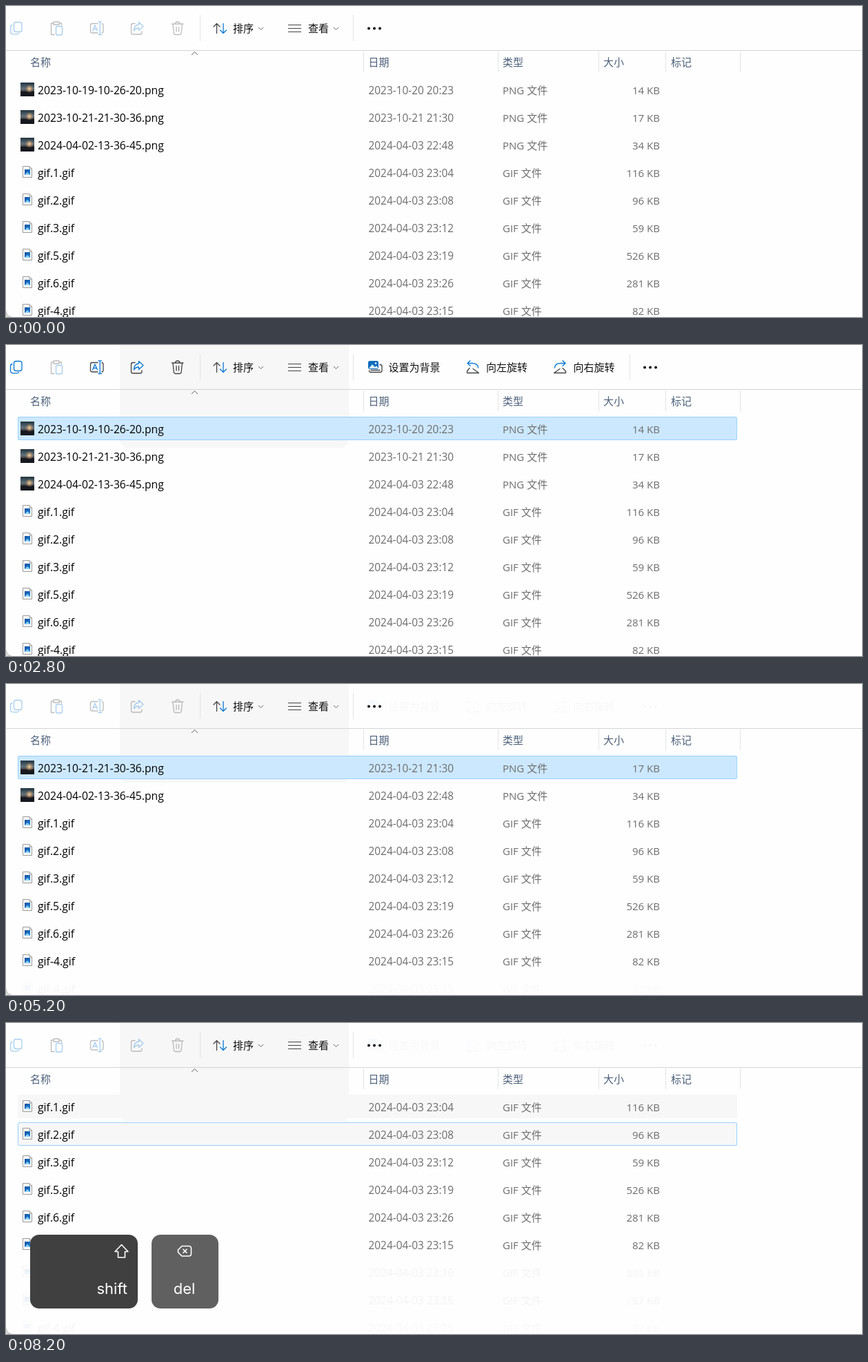
An HTML page that plays this animation: 1241 by 451 pixels, repeating every 8800 ms.

```html
<!DOCTYPE html>
<html lang="zh-CN">
<head>
<meta charset="utf-8">
<title>文件列表</title>
<style>
html, body { margin: 0; width: 100%; height: 100%; overflow: hidden; background: #fefefe; }
svg { display: block; width: 1241px; height: 451px; }
text { font-family: "Open Sans", "Noto Sans CJK SC", "Noto Sans CJK", sans-serif; font-size: 15px; white-space: pre; }
.key { font-family: Inter, sans-serif; font-size: 22px; fill: #fff; }
.line { fill: none; stroke: #444; stroke-width: 1.3; stroke-linecap: round; stroke-linejoin: round; }
.blue { stroke: #0a78d4; }
</style>
</head>
<body>
<svg id="stage" viewBox="0 0 1241 451" xmlns="http://www.w3.org/2000/svg">
  <defs>
    <linearGradient id="sky" x2="0" y2="1">
      <stop offset="0" stop-color="#20333f"/>
      <stop offset=".45" stop-color="#62727a"/>
      <stop offset=".6" stop-color="#4c4a4a"/>
      <stop offset=".68" stop-color="#17191f"/>
      <stop offset="1" stop-color="#15181f"/>
    </linearGradient>
    <radialGradient id="sun">
      <stop offset="0" stop-color="#ffe2b0"/>
      <stop offset=".4" stop-color="#d7a878" stop-opacity=".7"/>
      <stop offset="1" stop-color="#d7a878" stop-opacity="0"/>
    </radialGradient>
    <linearGradient id="picture" x2="1" y2="1">
      <stop offset="0" stop-color="#1b4f9c"/>
      <stop offset="1" stop-color="#1687dc"/>
    </linearGradient>
    <g id="png">
      <rect x="21" y="111" width="20" height="20" fill="url(#sky)"/>
      <circle cx="34" cy="120" r="6" fill="url(#sun)"/>
    </g>
    <g id="gif">
      <path d="M24.5 112.5H34L37.5 116V128.500H24.500Z" fill="#fbfbfb" stroke="#9a9a9a"/>
      <path d="M34 112.500V116H37.500" fill="none" stroke="#9a9a9a"/>
      <rect x="27" y="117" width="8" height="8" fill="url(#picture)"/>
      <path d="M27 125L31 121L35 125Z" fill="#8fd0f5"/>
    </g>
  </defs>
  <g id="scene"></g>
</svg>
<script>
const LOOP = 8800, STEP = 200;
const HOVER = '#e5f3ff', SELECTED = '#cce8ff', EDGE = '#99d1ff', SHADE = '#f7f7f7';
const GREY = '#6d6d6d';

const files = [
  ['2023-10-19-10-26-20.png', '2023-10-20 20:23', 14],
  ['2023-10-21-21-30-36.png', '2023-10-21 21:30', 17],
  ['2024-04-02-13-36-45.png', '2024-04-03 22:48', 34],
  ['gif.1.gif', '2024-04-03 23:04', 116],
  ['gif.2.gif', '2024-04-03 23:08', 96],
  ['gif.3.gif', '2024-04-03 23:12', 59],
  ['gif.5.gif', '2024-04-03 23:19', 526],
  ['gif.6.gif', '2024-04-03 23:26', 281],
  ['gif-4.gif', '2024-04-03 23:15', 82]
];

const within = (t, from, to) => t >= from && t < to;
const text = (x, y, s, fill = '#111', extra = '') => `<text x="${x}" y="${y}" fill="${fill}" ${extra}>${s}</text>`;
const rect = (x, y, w, h, fill, extra = '') => `<rect x="${x}" y="${y}" width="${w}" height="${h}" fill="${fill}" ${extra}/>`;
const line = (d, cls = '') => `<path class="line ${cls}" d="${d}"/>`;
const group = (s, attrs) => `<g ${attrs}>${s}</g>`;
const vline = (x, y, h) => rect(x, y, 1, h, '#e4e4e4');
const dots = x => [x - 8, x, x + 8].map(cx => `<circle cx="${cx}" cy="32.500" r="2" fill="#111"/>`).join('');
const chevron = x => `<path d="M${x} 31l3.500 3.500l3.500 -3.500" fill="none" stroke="#666"/>`;

const copyIcon = '<rect class="line blue" x="11.500" y="23.500" width="11.500" height="14" rx="3"/>' +
  line('M9 27.500Q6.500 28 6.500 31V37Q6.500 40.800 10.500 40.800H15.500Q18 40.800 18.600 39.500', 'blue');
const pasteIcon = line('M69 25H65.500V41.500H70M77 25H80.500V28M69 23H77V27H69Z') +
  '<rect class="line blue" x="72.500" y="29.500" width="9" height="12.500" rx="2"/>';
const renameIcon = line('M133 25.500H125Q122.500 25.500 122.500 28V36.500Q122.500 39 125 39H133M139 25.500Q141 26 141 28V36.500Q141 38.500 139 39') +
  line('M125.500 36L129 28L132.500 36M126.800 33.500H131.200M134 22.800H138.500M136.200 22.800V41.500M134 41.500H138.500', 'blue');
const shareIcon = line('M187 25.500H184Q181.500 25.500 181.500 28V38.500Q181.500 41 184 41H194.500Q197 41 197 38.500V37') +
  line('M192.500 23.500L199 29.500L192.500 35.500V32Q187.500 32 185.500 36Q185.500 27.500 192.500 27Z', 'blue');
const trashIcon = line('M240.500 26H257M245.500 26Q245.500 23 248.800 23Q252 23 252 26M242 26L243.300 39Q243.500 41.500 246 41.500H251.500Q254 41.500 254.200 39L255.500 26M247 30.500V37M250.500 30.500V37');

function toolbar(on) {
  const dim = 'opacity=".35"';
  const state = on ? '' : dim;
  return group(copyIcon, state) + group(pasteIcon, dim) +
    group(renameIcon + shareIcon + trashIcon, state) +
    vline(281, 13, 38) + vline(503, 13, 38) +
    line('M305.500 39.500V25.500M301 30L305.500 25.500L310 30') +
    line('M315 25.500V39.500M310.500 35L315 39.500L319.500 35', 'blue') +
    text(329, 38, '排序') + chevron(366) +
    [27, 32, 37].map(y => rect(409, y, 19, 1, '#444')).join('') +
    text(438, 38, '查看') + chevron(475) +
    (on ? imageTools() : dots(534));
}

function imageTools() {
  return rect(525, 23, 15, 12, '#0f6cbd', 'rx="2.500"') +
    '<path d="M526 34L531 28L535 32L537 30L540 34Z" fill="#d8ecfb"/><circle cx="536" cy="26.500" r="1.300" fill="#fff"/>' +
    line('M542 28.500Q545 28.500 545 31V37Q545 39.500 542.500 39.500H529Q526.500 39.500 526.500 37M529 36.500H542') +
    line('M672 33.500L668.500 38V40.500H685.500L677 34.500') +
    line('M684.500 33Q684 26.500 676 26.500H669M673 22.800L669 26.500L673 30.200', 'blue') +
    line('M807 33.500L811.500 38V40.500H794.500L803 34.500') +
    line('M795.500 33Q796 26.500 804 26.500H811M807 22.800L811 26.500L807 30.200', 'blue') +
    text(554.500, 38, '设置为背景') + text(696, 38, '向左旋转') + text(822.500, 38, '向右旋转') +
    vline(904, 13, 38) + dots(934);
}

function header(hovered) {
  const labels = [[35, '名称'], [525.500, '日期'], [720, '类型'], [866, '大小'], [964, '标记']];
  return (hovered ? rect(0, 65, 518, 31, '#d9ebf9') : '') +
    rect(0, 64, 1241, 1, '#d2d5d5') +
    [518, 713, 859, 956, 1064].map(x => vline(x, 66, 30)).join('') +
    labels.map(([x, s]) => text(x, 87, s, '#4c607a')).join('') +
    '<path d="M269 71l4.500 -4.500l4.500 4.500" fill="none" stroke="#666"/>';
}

function row([name, date, size], i, opacity = 1) {
  const type = name.slice(-3);
  const size154 = 'style="font-size:15.400px"';
  return group(`<use href="#${type}"/>` +
    text(46, 128, name, '#000', 'style="font-size:15.700px"') +
    text(525.500, 128, date, GREY, size154) +
    text(720, 128, type.toUpperCase() + ' 文件', GREY) +
    text(948, 128, size + ' KB', GREY, 'text-anchor="end"'),
    `transform="translate(0 ${i * 40})" opacity="${opacity}"`);
}

const bar = (i, fill, edge = fill) =>
  rect(17.5, 104.5 + 40 * i, 1042, 33, fill, `stroke="${edge}" rx="1.500"`);

function highlights(t) {
  let s = '';
  if (within(t, 400, 600)) s += bar(0, HOVER);
  if (within(t, 600, 3000) || within(t, 5200, 5600)) s += bar(0, SELECTED, EDGE);
  if (within(t, 3000, 5200)) s += bar(0, SHADE, EDGE);
  if (within(t, 3600, 4000) || within(t, 4200, 5200) || within(t, 5400, 5600)) s += bar(1, HOVER);
  if (within(t, 5600, 7400)) s += bar(0, SELECTED) + bar(1, SELECTED, EDGE);
  if (t >= 7400) s += bar(0, SHADE) + bar(1, SHADE, EDGE);
  if (within(t, 4000, 4200) || within(t, 6400, 8200)) s += bar(2, HOVER);
  return s;
}

// Faint remains of rows that moved up.
function ghosts(t, removed) {
  const earlier = [0, 1].filter(n => n < removed);
  let s = within(t, 3000, 4000) ? row(files[2], 2, .035) : '';
  for (const n of earlier)
    for (let i = files.length - removed; i < files.length - n; i++) s += row(files[i + n], i, .035);
  return s;
}

function shade(t) {
  if (t < 1600) return '';
  if (t < 3000) return rect(165, -20, 332, 169, SHADE, 'rx="12"');
  return rect(165, 0, 332, 104, SHADE) + rect(169, 104, 324, 39, SHADE);
}

function menu() {
  const items = [[22, '创建快捷方式(S)'], [49, '删除(D)'], [76, '重命名(M)'], [112, '属性(R)']];
  return rect(177.5, -20, 307, 146, '#f9f9f9', 'rx="7" stroke="#dedede"') +
    rect(183, 93, 296, 27, '#efefef', 'rx="4"') + rect(183, 88, 296, 1, '#e2e2e2') +
    items.map(([y, s]) => text(222, y, s)).join('');
}

function keycap(x, w, fill, scale, opacity, content) {
  const cx = x + w / 2, cy = 360.5;
  return group(rect(x, 307, w, 107, fill, 'rx="13"') + content,
    `opacity="${opacity}" transform="translate(${cx} ${cy}) scale(${scale}) translate(${-cx} ${-cy})"`);
}

function keys(t) {
  const white = 'fill="none" stroke="#fff" stroke-width="1.600" stroke-linejoin="round" stroke-linecap="round"';
  let s = '';
  if (t >= 5600) {
    const early = t < 6000;
    s += keycap(35, 156, t < 6200 ? '#606060' : '#404040', early ? .85 : 1, early ? .7 : 1,
      `<path d="M167.500 321.500L177 331.500H172.500V340H162.500V331.500H158Z" ${white}/>` +
      '<text class="key" x="176" y="393" text-anchor="end">shift</text>');
  }
  if (t >= 7200)
    s += keycap(211, 97, '#606060', t < 7400 ? .975 : 1, 1,
      `<path d="M255 323.500H265Q268.500 323.500 268.500 327V334.500Q268.500 338 265 338H255L249.500 332.500V329ZM257 328.200L262 333.200M262 328.200L257 333.200" ${white}/>` +
      '<text class="key" x="258.500" y="393" text-anchor="middle">del</text>');
  return s;
}

function scene(t) {
  const removed = t >= 7400 ? 3 : t >= 3000 ? 1 : 0;
  const toolsOn = within(t, 800, 3000) || within(t, 5400, 7400);
  return shade(t) +
    (removed && !toolsOn ? group(imageTools(), 'opacity=".025"') : '') +
    toolbar(toolsOn) + header(within(t, 200, 400)) + highlights(t) + ghosts(t, removed) +
    files.slice(removed).map((f, i) => row(f, i)).join('') +
    (within(t, 1600, 2800) ? menu() : '') + keys(t) +
    '<path d="M0 441Q1 450 9 451H0Z" fill="#a6a6a6"/><path d="M0 444Q2 450 7 451H0Z" fill="#dcdcdc"/>';
}

const target = document.getElementById('scene');
const start = performance.now();
let shown = -1;
function tick() {
  const t = Math.floor((performance.now() - start) % LOOP / STEP) * STEP;
  if (t !== shown) target.innerHTML = scene(shown = t);
  requestAnimationFrame(tick);
}
tick();
</script>
</body>
</html>
```
